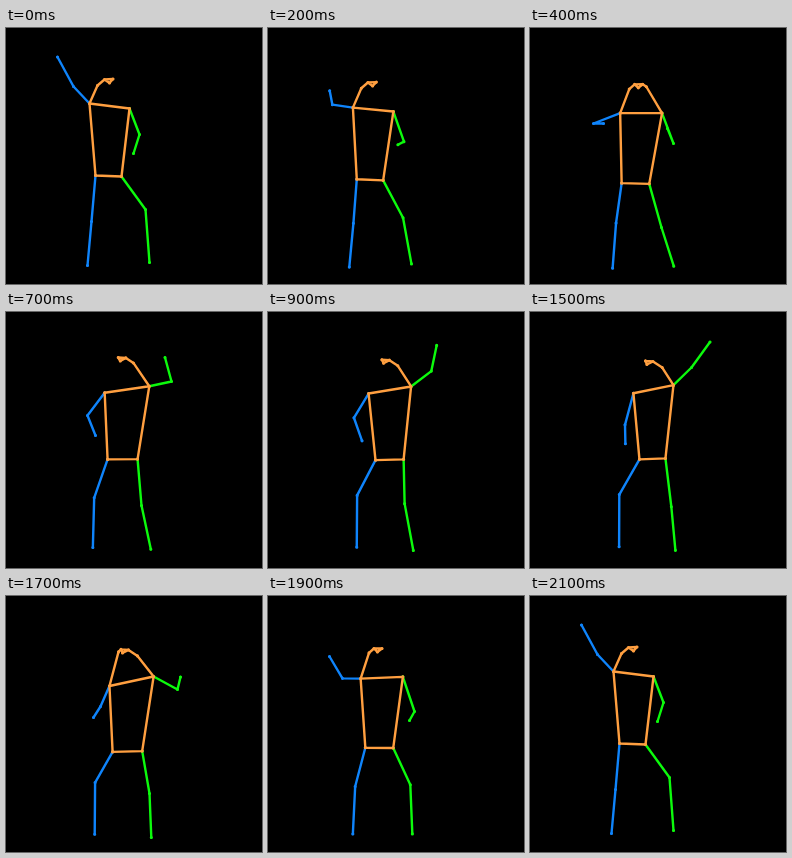
An HTML page that plays this animation: 256x256 px, repeating every 2.2 s.

```html
<!DOCTYPE html>
<html lang="en">
<head>
<meta charset="utf-8">
<title>Dancing skeleton</title>
<style>
  html, body { margin: 0; width: 100%; height: 100%; overflow: hidden; background: #000; }
  svg { display: block; width: 100vw; height: 100vh; }
  path { fill: none; stroke-linecap: round; stroke-linejoin: round; transform: translate(.5px, .5px); }
  .bone { stroke-width: 2.4; }
  .joint { stroke-width: 3.1; }
  .right { stroke: #0f84fb; }
  .left { stroke: #0cfa0c; }
  .core { stroke: #ff9f40; }
</style>
</head>
<body>
<svg viewBox="0 0 256 256"></svg>
<script>
const STEP = 100, LOOP = 2200, CYCLE = 21;

// Drivers of the dance: [tick, dip, facing front, sway of head, chest and hips].
const drive = [
  [0, 0, 0, 0, 0, 0],
  [4, 1, .4, .37, .4, .14],
  [7, -.1, 1, .83, .92, .67],
  [11, .15, 0, .97, .95, 1.05],
  [15, -.15, 0, 1.03, 1.05, .95],
  [17, 1, .9, 1, 1.16, .9]
];

// Each joint sways between two points; a part also sinks, rises and widens as a whole.
const parts = [
  { sway: "head", sink: 7, rise: 4, widen: 0, joints: {
    rEar: [[91, 57], [112, 52]], rEye: [[98, 51], [114.5, 49.5]],
    nose: [[103, 54.5], [116, 53]],
    lEye: [[106.5, 50.5], [122, 50]], lEar: [[107, 51], [131, 56]] } },
  { sway: "chest", sink: 7, rise: 0, widen: 2.3, joints: {
    rShoulder: [[83, 75], [102, 81.5]], lShoulder: [[123, 80], [142, 74]] } },
  { sway: "hips", sink: 7.5, rise: 0, widen: 2, joints: {
    rHip: [[89, 147], [110, 148]], lHip: [[115, 148], [136, 147]] } },
  { sway: "hips", sink: 3, rise: 0, widen: 0, joints: {
    rKnee: [[85, 193], [89, 182]], rAnkle: [[81, 237], [89, 234.5]],
    lAnkle: [[143, 234], [145, 238.5]] } }
];

// Freely swinging joints follow a curve through a few points: [tick, x, y].
const swings = {
  rElbow: [[0, 67, 58], [4, 63, 95], [7, 81, 103], [13, 90, 108], [17, 94, 110], [20, 64, 66]],
  rWrist: [[0, 51, 28.5], [4, 73, 95], [7, 89, 123], [13, 97, 130], [17, 87, 121],
           [19, 61, 60], [20, 54, 23]],
  lElbow: [[0, 133, 106], [4, 143, 115], [7, 165, 69], [11, 158, 55], [15, 161, 55],
           [17, 171, 93], [19, 146, 115]],
  lWrist: [[0, 127, 125], [4, 137, 100], [7, 158.5, 45], [11, 175, 29], [15, 179.5, 29.5],
           [17, 174, 80.5], [19, 141, 124]],
  lKnee: [[0, 139, 181], [4, 131, 199], [7, 135, 193], [13, 138, 190], [17, 143, 197]]
};

const groups = [
  ["right", ["rShoulder rElbow rWrist", "rHip rKnee rAnkle"]],
  ["left", ["lShoulder lElbow lWrist", "lHip lKnee lAnkle"]],
  ["core", ["rShoulder lShoulder lHip rHip rShoulder", "rEye nose lEye rEye",
            "rShoulder rEar rEye", "lShoulder lEar lEye"]]
].map(([color, chains]) => ({
  chains: chains.map(c => c.split(" ")),
  bone: addPath("bone " + color),
  joint: addPath("joint " + color)
}));

function addPath(cls) {
  const path = document.createElementNS("http://www.w3.org/2000/svg", "path");
  path.setAttribute("class", cls);
  return document.querySelector("svg").appendChild(path);
}

// Key i of a closed track, with its tick unwrapped past either end.
function key(track, i) {
  const n = track.length, turn = Math.floor(i / n);
  const [tick, ...values] = track[i - turn * n];
  return [tick + turn * CYCLE, ...values];
}

// Cubic Hermite curve through unevenly spaced keys.
function follow(track, tick) {
  const i = track.findLastIndex(k => k[0] <= tick);
  const [a, b, c, d] = [-1, 0, 1, 2].map(o => key(track, i + o));
  const span = c[0] - b[0], s = (tick - b[0]) / span;
  return b.map((from, k) => {
    const m0 = (c[k] - a[k]) / (c[0] - a[0]) * span;
    const m1 = (d[k] - b[k]) / (d[0] - b[0]) * span;
    return from + (c[k] - from) * s * s * (3 - 2 * s)
      + m0 * s * (1 - s) ** 2 - m1 * s * s * (1 - s);
  }).slice(1);
}

function pose(tick) {
  const [dip, front, head, chest, hips] = follow(drive, tick);
  const sways = { head, chest, hips }, at = {};
  for (const { sway, sink, rise, widen, joints } of parts) {
    const s = sways[sway];
    for (const [name, [from, to]] of Object.entries(joints)) {
      const side = name[0] === "r" ? -1 : 1;
      at[name] = [
        from[0] + (to[0] - from[0]) * s + side * widen * front,
        from[1] + (to[1] - from[1]) * s + sink * dip - rise * front
      ];
    }
  }
  for (const name in swings) at[name] = follow(swings[name], tick);
  return at;
}

// The far ear disappears as the head turns.
function hidden(name, tick) {
  if (name === "rEar") return tick > 4 && tick < 17;
  if (name === "lEar") return tick < 3 || tick > 18;
  return false;
}

function draw(tick) {
  const at = pose(tick);
  for (const { chains, bone, joint } of groups) {
    const shown = chains.filter(c => !c.some(n => hidden(n, tick)));
    bone.setAttribute("d", shown.map(c => "M" + c.map(n => at[n]).join("L")).join(""));
    joint.setAttribute("d", shown.flat().map(n => `M${at[n]}h0`).join(""));
  }
}

function frame() {
  draw(Math.floor(performance.now() % LOOP / STEP) % CYCLE);
  requestAnimationFrame(frame);
}
frame();
</script>
</body>
</html>
```
